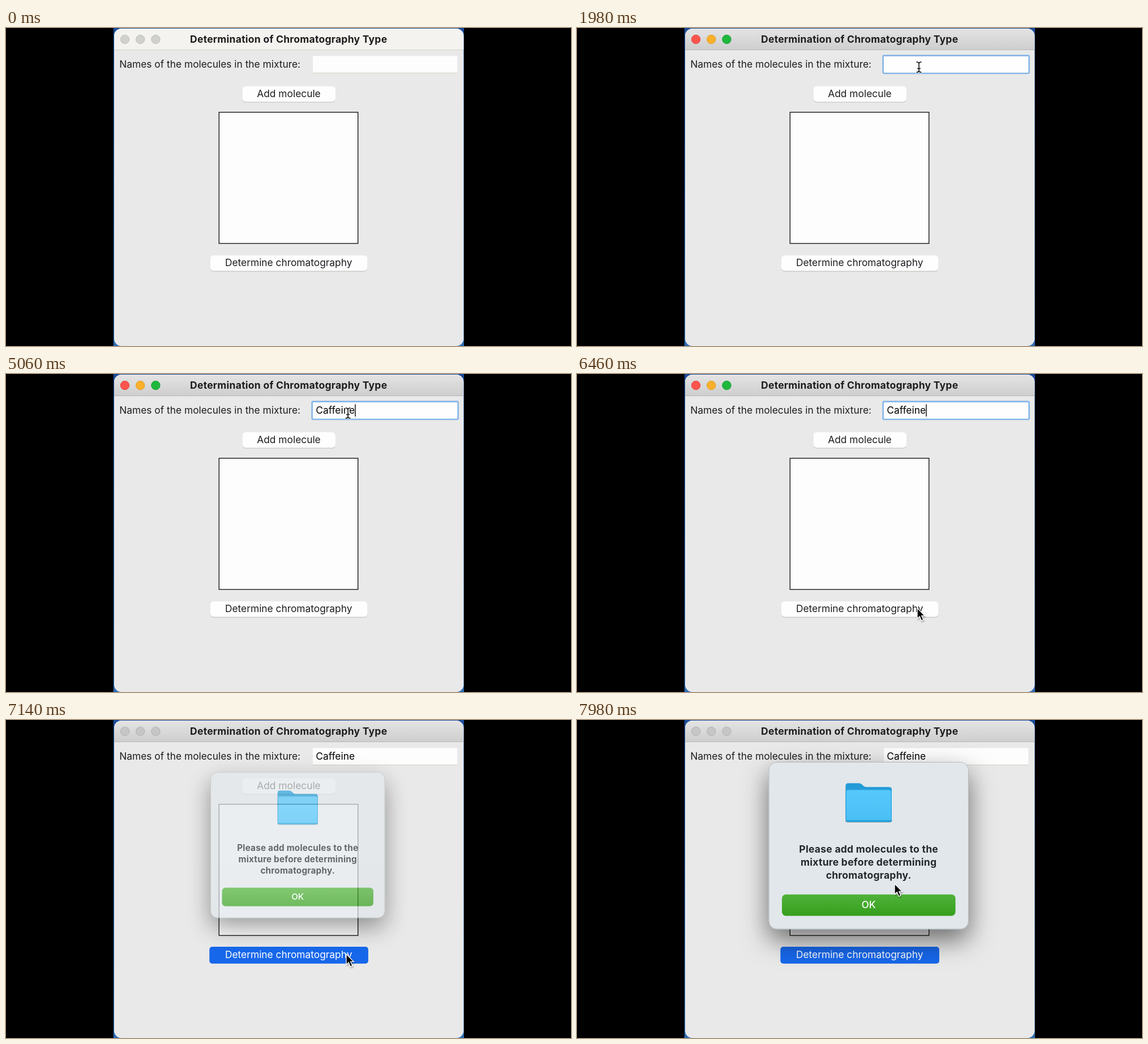
Animation, 998 px wide and 561 px high, one loop 8000 ms. Source, as an HTML page:

```html
<!DOCTYPE html>
<html lang="en">
<head>
<meta charset="utf-8">
<title>Determination of Chromatography Type</title>
<style>
  html, body { margin: 0; width: 100%; height: 100%; overflow: hidden; background: #000; }
  svg { display: block; width: 100vw; height: 100vh; }
  text { font: 400 17.35px Inter, "Open Sans", sans-serif; fill: #1d1d1d; white-space: pre; }
  .mid { text-anchor: middle; }
  .bold { font-weight: 700; font-size: 17.5px; letter-spacing: .26px; }
  #dialog .bold { fill: #25282a; }
  #dialog .ok { fill: #fff; font-weight: 500; }
</style>
</head>
<body>
<svg viewBox="0 0 998 561">
  <defs>
    <linearGradient id="desk" x2="0" y2="1">
      <stop offset="0" stop-color="#1c4c9b"/><stop offset="1" stop-color="#2f6db4"/>
    </linearGradient>
    <linearGradient id="bar" x2="0" y2="1">
      <stop offset="0" stop-color="#e4e4e4"/><stop offset="1" stop-color="#cecece"/>
    </linearGradient>
    <linearGradient id="green" x2="0" y2="1">
      <stop offset="0" stop-color="#50b23a"/><stop offset="1" stop-color="#359f1d"/>
    </linearGradient>
    <linearGradient id="front" x2="0" y2="1">
      <stop offset="0" stop-color="#57c8fb"/><stop offset="1" stop-color="#4abff5"/>
    </linearGradient>
    <filter id="glow" x="-40%" y="-40%" width="180%" height="180%">
      <feDropShadow dx="0" dy="19" stdDeviation="23" flood-color="#000" flood-opacity=".54"/>
    </filter>
    <filter id="soft" x="-20%" y="-20%" width="140%" height="160%">
      <feDropShadow dx="0" dy="1" stdDeviation=".7" flood-color="#55552f" flood-opacity=".38"/>
    </filter>
    <filter id="under" x="-50%" y="-50%" width="220%" height="220%">
      <feDropShadow dx="1" dy="2" stdDeviation="1.5" flood-color="#000" flood-opacity=".35"/>
    </filter>
    <clipPath id="frame"><rect x="191" y="1" width="617.3" height="560" rx="13"/></clipPath>
    <clipPath id="screen"><rect x="189.5" width="619.5" height="561"/></clipPath>
  </defs>

  <rect width="998" height="561"/>
  <g clip-path="url(#screen)">
    <rect x="189.5" width="619.5" height="561" fill="url(#desk)"/>
    <g clip-path="url(#frame)">
      <rect x="191" y="1" width="618" height="560" fill="#e9e9e9"/>
      <rect id="titlebar" x="191" y="1" width="618" height="37"/>
      <rect id="rule" x="191" y="38" width="618" height="1"/>
    </g>
    <g id="lights" stroke-width="1">
      <circle cx="210" cy="20" r="7.7"/>
      <circle cx="237.2" cy="20" r="7.7"/>
      <circle cx="264.4" cy="20" r="7.7"/>
    </g>
    <text class="mid bold" x="499.2" y="26">Determination of Chromatography Type</text>
    <text x="200.2" y="70.3">Names of the molecules in the mixture:</text>

    <rect x="542" y="49.5" width="255.2" height="29.6" fill="#fdfdfd"/>
    <path d="M542 79.3H797.2" stroke="#c9c9b9" stroke-width=".8"/>
    <rect id="ring" x="540.6" y="48.6" width="258" height="31.4" rx="2" fill="#fefefe" stroke="#86b6e8" stroke-width="2.6"/>
    <text id="entry" x="547.3" y="70.3" style="fill:#000"></text>
    <rect id="caret" y="53.5" width="1.4" height="21.5"/>

    <rect x="417.5" y="102.8" width="164.5" height="27.4" rx="6" fill="#fefefe" filter="url(#soft)"/>
    <text class="mid" x="499.5" y="122.3">Add molecule</text>
    <rect x="376.3" y="148.6" width="245.4" height="231.5" fill="#fdfdfd" stroke="#080808" stroke-width="1.3"/>
    <rect id="plain" x="360.8" y="401.2" width="277.7" height="27.4" rx="6" fill="#fefefe" filter="url(#soft)"/>
    <rect id="pressed" x="359.3" y="400" width="280.6" height="29.8" rx="5" fill="#1767ea"/>
    <text id="action" class="mid" x="499.2" y="420.3">Determine chromatography</text>

    <g id="dialog">
      <rect x="339" y="74.5" width="352.5" height="294.3" rx="14" fill="#e1e7eb" stroke="#b3b8bc" filter="url(#glow)"/>
      <g filter="url(#soft)">
        <path d="M474.5 175V116q0-4.500 4.500-4.500H498q3 0 5 2l3 2.800q2 2 5 2H551q5 0 5 4.500V175q0 5-5 5H479.500q-5 0-5-5Z" fill="#219bd6"/>
        <rect x="475.2" y="123" width="80.1" height="56" rx="4.500" fill="url(#front)" stroke="#35a9e2" stroke-width="1.400"/>
        <path d="M475.500 178H555" stroke="#249ed8" stroke-width="2.400" stroke-linecap="round"/>
      </g>
      <text class="mid bold" x="515.2" y="234">Please add molecules to the</text>
      <text class="mid bold" x="515.2" y="257">mixture before determining</text>
      <text class="mid bold" x="515.2" y="280">chromatography.</text>
      <rect x="362" y="307.8" width="306.500" height="37.700" rx="7" fill="url(#green)"/>
      <text class="mid ok" x="515.2" y="332.3">OK</text>
    </g>

    <path id="arrow" d="M0 0V18.500L4.300 14.600L7.300 22L10.800 20.600L7.700 13.400H13.200Z" stroke="#fff" stroke-width="1.300" filter="url(#under)"/>
    <g id="beam" fill="none" stroke-linecap="round">
      <path d="M-4-9Q-.5-9 0-6.500Q.5-9 4-9M0-6.500V6.500M-4 9Q-.5 9 0 6.500Q.5 9 4 9M-2.500 2.500H2.500" stroke="#fff" stroke-width="3.400"/>
      <path d="M-4-9Q-.5-9 0-6.500Q.5-9 4-9M0-6.500V6.500M-4 9Q-.5 9 0 6.500Q.5 9 4 9M-2.500 2.500H2.500" stroke="#111" stroke-width="1.600"/>
    </g>
  </g>
</svg>
<script>
const LOOP = 8000;
const ACTIVATE = 1180, PRESS = 6620, ALERT = 6900;
const WORD = 'Caffeine';
const KEYS = [2560, 2800, 3020, 3220, 3560, 3780, 4180, 4640];

// rows of time, value...
const PATH = [
  [20, 560, 575], [820, 603, 67], [5600, 603, 67],
  [6340, 602, 411], [6460, 601, 413], [7480, 601, 413], [7980, 561, 289]
];
// time, scale, centre height
const POP = [[ALERT, .7, 221], [7020, .752, 221], [7280, 1.02, 220.7], [7440, 1, 222]];
const FADE = [[ALERT, 0], [7020, .5], [7280, .94], [7420, 1]];

const $ = id => document.getElementById(id);
const set = (el, attrs) => { for (const k in attrs) el.setAttribute(k, attrs[k]); };
const show = (id, on) => set($(id), { visibility: on ? 'visible' : 'hidden' });
const smooth = u => u * u * (3 - 2 * u);
const linear = u => u;

function sample(rows, t, ease) {
  if (t <= rows[0][0]) return rows[0].slice(1);
  const i = rows.findIndex(r => r[0] > t);
  if (i < 0) return rows[rows.length - 1].slice(1);
  const a = rows[i - 1], b = rows[i];
  const u = ease((t - a[0]) / (b[0] - a[0]));
  return a.slice(1).map((v, k) => v + (b[k + 1] - v) * u);
}

function drawWindow(t) {
  const started = t >= ACTIVATE, active = started && t < ALERT;
  set($('titlebar'), { fill: started ? 'url(#bar)' : '#f4f3f0' });
  set($('rule'), { fill: started ? '#b9b9b9' : '#d3d3c9' });
  const fills = ['#fd544d', '#f9b02b', '#1fb73c'];
  const edges = ['#e2463f', '#e09d24', '#17a231'];
  [...$('lights').children].forEach((dot, i) => set(dot, {
    fill: active ? fills[i] : started ? '#c6c6c6' : '#d0d0ce',
    stroke: active ? edges[i] : started ? '#b2b2b2' : '#bfbfbc'
  }));
}

function drawEntry(t) {
  const focused = t >= ACTIVATE && t < ALERT;
  const entry = $('entry');
  entry.textContent = WORD.slice(0, KEYS.filter(k => k <= t).length);
  const blinkOn = t >= KEYS[0] || (t - ACTIVATE) % 900 < 600;
  show('ring', focused);
  show('caret', focused && blinkOn);
  set($('caret'), { x: 547.5 + entry.getComputedTextLength() });
}

function drawButton(t) {
  const down = t >= PRESS;
  show('plain', !down);
  show('pressed', down);
  $('action').style.fill = down ? '#fff' : '';
}

function drawDialog(t) {
  const [scale, y] = sample(POP, t, smooth), [opacity] = sample(FADE, t, linear);
  show('dialog', t >= ALERT);
  set($('dialog'), {
    opacity,
    transform: `translate(515.25 ${y}) scale(${scale}) translate(-515.25 -222)`
  });
}

function drawCursor(t) {
  const [x, y] = sample(PATH, t, smooth);
  const beam = t >= ACTIVATE && y < 82;
  show('arrow', t >= 20 && !beam);
  show('beam', beam);
  set($('arrow'), { transform: `translate(${x} ${y})` });
  set($('beam'), { transform: `translate(${x + 1} ${y + 2})` });
}

function draw(t) {
  [drawWindow, drawEntry, drawButton, drawDialog, drawCursor].forEach(part => part(t));
}

const start = performance.now();
function tick() {
  draw((performance.now() - start) % LOOP);
  requestAnimationFrame(tick);
}
tick();
</script>
</body>
</html>
```
